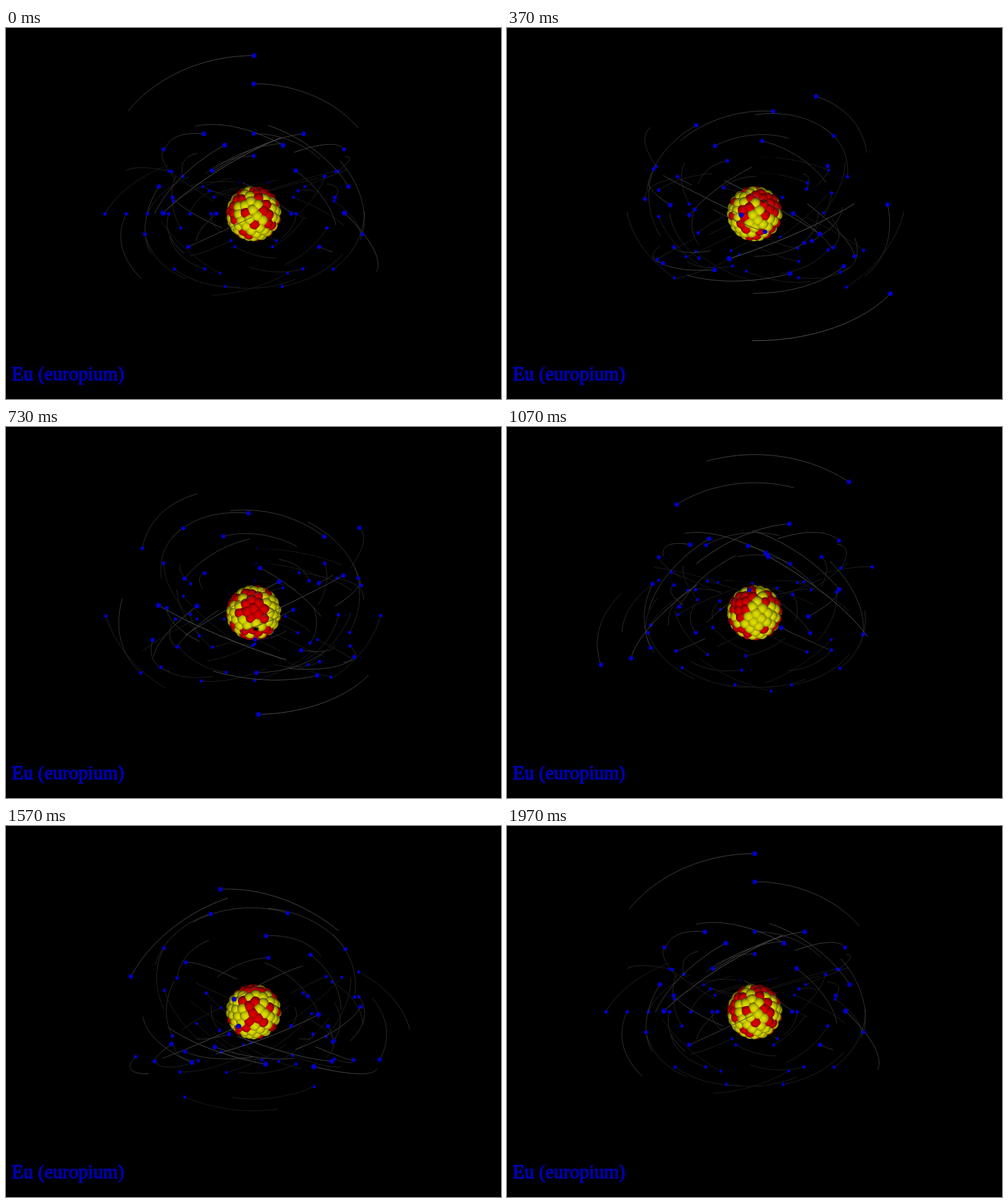
Animation, 800 px wide and 600 px high, one loop 2000 ms. Source, as an HTML page with a canvas:

```html
<!DOCTYPE html>
<html>
<head>
<meta charset="utf-8">
<style>
html, body { margin: 0; width: 100%; height: 100%; overflow: hidden; background: #000; }
canvas { position: absolute; left: 0; top: 0; }
div {
  position: absolute; left: 9px; top: 542px; font: 31px/35px "Liberation Serif", serif; white-space: pre;
  color: #0000b0; -webkit-text-stroke: .35px #0000b0;
  text-shadow: .7px -.4px #00009c, 1.3px -.8px #000090;
}
span { -webkit-text-stroke-width: 1px; }
</style>
</head>
<body>
<canvas id="stage" width="800" height="600"></canvas>
<div><span>Eu</span> (europium)</div>
<script>
const ctx = document.getElementById('stage').getContext('2d');
const TAU = 2 * Math.PI, TILT = 35 * TAU / 360, CT = Math.cos(TILT), ST = Math.sin(TILT);
const UNIT = 34.35, CAMERA = 600, FRAMES = 59, TRAIL = TAU / 8, CUTS = 24;
const CORE = 36, BALL = 9, SIZE = 200;

// Each shell: electron count and phase step between neighbours, in turns
const SHELLS = [[2, 3 / 4], [8, 5 / 8], [18, 13 / 18], [25, 23 / 25], [8, 5 / 8], [2, 1 / 2]];
const electrons = SHELLS.flatMap(([n, step], k) => Array.from({ length: n }, (_, i) => ({
  r: UNIT * (k + 2), dir: k % 2 ? 1 : -1, tilt: i * Math.PI / n, phase: i * step * TAU
})));

// View from 35 degrees above, with perspective
function project(x, y, z) {
  const d = ST * y + CT * z, p = CAMERA / (CAMERA - d);
  return { x: 400 + x * p, y: 300 - (CT * y - ST * z) * p, d, p };
}

// Point on an orbit tilted by the same angle about x, then z
function orbit(e, turn) {
  const a = e.phase + e.dir * turn, c = Math.cos(e.tilt), s = Math.sin(e.tilt);
  const u = -Math.cos(a) * e.r, w = Math.sin(a) * e.r;
  const x = u * c - w * s * s, y = u * s + w * s * c, z = w * c;
  const near = Math.hypot(x, y);
  return { ...project(x, y, z), shaded: z < 0 && near < 43, wx: x, wy: y, casts: z > 0 && near < 40 };
}

let seed = 11;
const random = () => (seed = seed * 16807 % 2147483647) / 2147483647;
const COUNT = 130;
const nucleons = Array.from({ length: COUNT }, (_, i) => {
  const y = 1 - (2 * i + 1) / COUNT, q = Math.sqrt(1 - y * y), a = i * Math.PI * (3 - Math.sqrt(5));
  return { x: q * Math.cos(a), y, z: q * Math.sin(a), red: random() < 63 / 152 };
});

const core = document.createElement('canvas');
core.width = core.height = SIZE;
const coreCtx = core.getContext('2d');

// Intersecting lit balls, drawn at double size with a depth buffer
function drawCore(turn) {
  const img = coreCtx.createImageData(SIZE, SIZE), depth = new Float32Array(SIZE * SIZE).fill(-1e3);
  const c = Math.cos(turn), s = Math.sin(turn);
  for (const n of nucleons) {
    const o = project(CORE * (n.x * c - n.z * s), CORE * n.y, CORE * (n.z * c + n.x * s));
    if (o.d < -20) continue;
    const cx = (o.x - 350) * 2, cy = (o.y - 250) * 2, r = BALL * o.p * 2;
    for (let y = Math.ceil(cy - r); y <= cy + r; y++) {
      for (let x = Math.ceil(cx - r); x <= cx + r; x++) {
        const nx = (x - cx) / r, ny = (cy - y) / r, h = 1 - nx * nx - ny * ny, at = y * SIZE + x;
        if (h < 0) continue;
        const nz = Math.sqrt(h), z = o.d + nz * BALL;
        if (z <= depth[at]) continue;
        depth[at] = z;
        const v = 50 + 172 * Math.max(0, .97 * nz - .24 * ny);
        img.data.set([v, n.red ? 0 : v, 0, 255], at * 4);
      }
    }
  }
  coreCtx.putImageData(img, 0, 0);
  ctx.drawImage(core, 350, 250, 100, 100);
}

function dot(x, y, r, fill) {
  ctx.fillStyle = fill;
  ctx.beginPath();
  ctx.arc(x, y, r, 0, TAU);
  ctx.fill();
}

function drawElectron(o) {
  const r = 3 * o.p, x = o.x + .4, y = o.y + .4;
  dot(x, y, r, o.shaded ? '#000046' : '#0000b0');
  if (!o.shaded) dot(x, y + r * .2, r * .6, '#0000d8');
}

function drawTrail({ points }, front) {
  for (let i = 1; i < points.length; i++) {
    const a = points[i - 1], b = points[i];
    if (b.d >= 0 !== front) continue;
    const g = 40 * b.p * b.p * (b.shaded ? .3 : 1);
    ctx.strokeStyle = `rgb(${g},${g},${g})`;
    ctx.beginPath();
    ctx.moveTo(a.x + .4, a.y + .4);
    ctx.lineTo(b.x + .4, b.y + .4);
    ctx.stroke();
  }
}

function drawShadow(o) {
  if (!o.casts) return;
  const s = project(o.wx, o.wy, Math.sqrt(44 * 44 - o.wx ** 2 - o.wy ** 2));
  if (s.d > 0) dot(s.x, s.y, 3, 'rgba(0,0,0,.6)');
}

function draw(frame) {
  const turn = 2 * TAU * frame / FRAMES;
  ctx.fillStyle = '#000';
  ctx.fillRect(0, 0, 800, 600);
  const paths = electrons.map(e => {
    const points = Array.from({ length: CUTS + 1 }, (_, i) => orbit(e, turn - TRAIL * i / CUTS));
    return { points, head: points[0] };
  }).sort((a, b) => a.head.d - b.head.d);
  for (const front of [false, true]) {
    if (front) {
      drawCore(turn / 2);
      paths.forEach(p => drawShadow(p.head));
    }
    paths.forEach(p => drawTrail(p, front));
    paths.filter(p => p.head.d >= 0 === front).forEach(p => drawElectron(p.head));
  }
}

let shown = -1;
function tick() {
  const t = performance.now() % 2000;
  const frame = Math.floor(.3 * (Math.floor(t / 10) + .5));
  if (frame !== shown) draw(shown = frame);
  requestAnimationFrame(tick);
}
tick();
</script>
</body>
</html>
```
